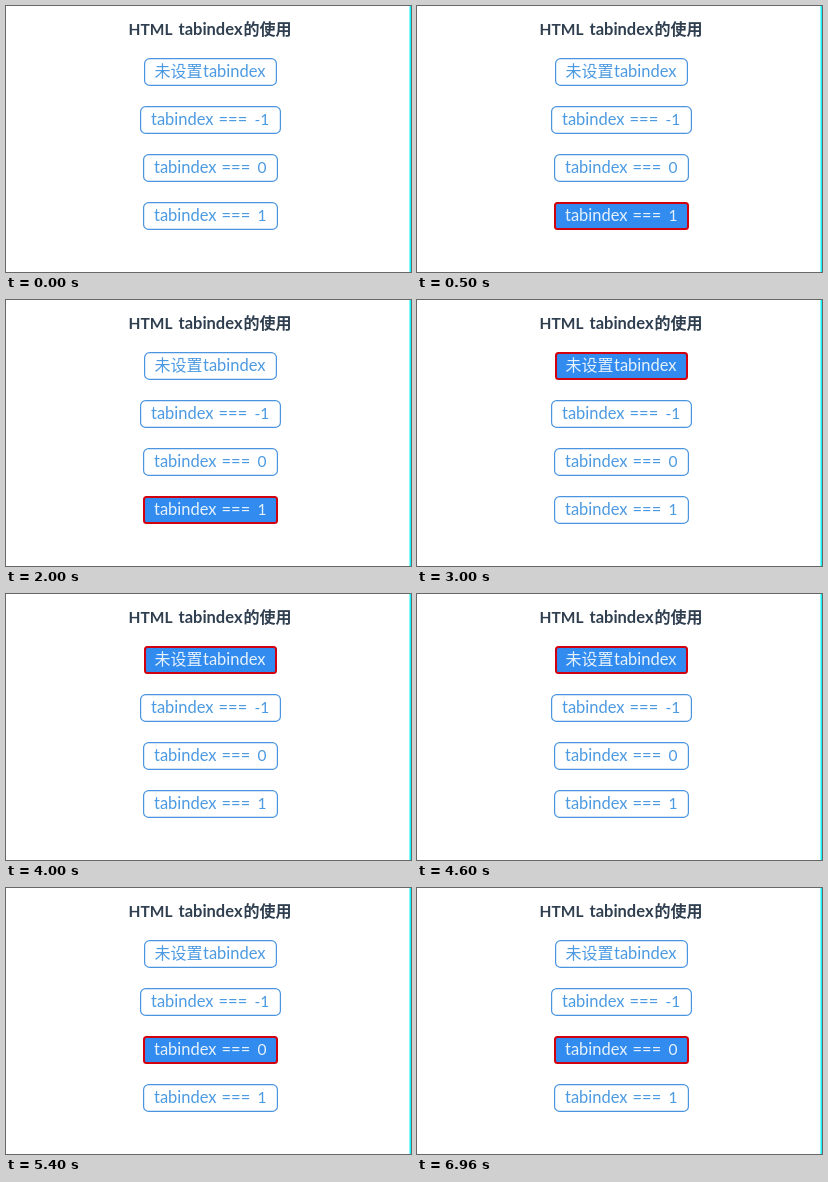
Write an HTML page with a canvas that moves like this. It is 405 px wide and 266 px high and loops after 8 s.

```html
<!DOCTYPE html>
<html lang="zh-CN">
<head>
<meta charset="utf-8">
<title>HTML tabindex的使用</title>
<style>
  html, body { margin: 0; width: 100%; height: 100%; overflow: hidden; background: #fff; }
  canvas { display: block; width: 405px; height: 266px; }
</style>
</head>
<body>
<canvas id="stage"></canvas>
<script>
const W = 405, H = 266, LOOP = 8000;
const INK = '#2f3f50', BORDER = '#4a94e0', LABEL = '#4c9ae2';
const FILL = '#328bee', FOCUS_BORDER = '#d2000f', FOCUS_LABEL = '#e6f2fd';
const LATIN = 'Lato, "Noto Sans CJK SC", "Noto Sans CJK", sans-serif';
const HAN = '"Noto Sans CJK SC", "Noto Sans CJK", sans-serif';

const canvas = document.getElementById('stage');
const ctx = canvas.getContext('2d');
const scale = window.devicePixelRatio || 1;
canvas.width = W * scale;
canvas.height = H * scale;

// Each word is [text, x, font]
const latin = (text, x, size = 16.5) => [text, x, `${size}px ${LATIN}`];
const han = (text, x) => [text, x, `16px ${HAN}`];
const row = (x, value, valueX) => [
  latin('tabindex', x), latin('===', x + 67.5), latin(value, valueX, 15.5)
];

const buttons = [
  { x: 138, y: 52, w: 133, words: [han('未设置', 148.5), latin('tabindex', 197)] },
  { x: 134, y: 100, w: 141, words: row(145, '-1', 248.5) },
  { x: 137, y: 148, w: 135, words: row(148, '0', 251.5) },
  { x: 137, y: 196, w: 135, words: row(148, '1', 251.5) }
];
const title = [
  ['HTML', 122.5, `bold 15.5px ${LATIN}`],
  ['tabindex', 172.5, `bold 16.5px ${LATIN}`],
  ['的使用', 237.5, `bold 16px ${HAN}`]
];

// Focus changes: [start time, button index]
const focusSteps = [[0, -1], [500, 3], [3000, 0], [5400, 2]];

function drawWords(words, y, color) {
  ctx.fillStyle = color;
  for (const [text, x, font] of words) {
    ctx.font = font;
    ctx.fillText(text, x, y);
  }
}

function drawButton({ x, y, w, words }, focused) {
  const inset = focused ? 1 : 0.6;
  ctx.beginPath();
  ctx.roundRect(x + inset, y + inset, w - 2 * inset, 28 - 2 * inset, focused ? 2.5 : 5);
  ctx.fillStyle = focused ? FILL : '#fff';
  ctx.fill();
  ctx.lineWidth = focused ? 2 : 1.2;
  ctx.strokeStyle = focused ? FOCUS_BORDER : BORDER;
  ctx.stroke();
  drawWords(words, y + 19, focused ? FOCUS_LABEL : LABEL);
}

function draw(now) {
  const time = now % LOOP;
  const focus = focusSteps.filter(([start]) => start <= time).pop()[1];
  ctx.setTransform(scale, 0, 0, scale, 0, 0);
  ctx.fillStyle = '#fff';
  ctx.fillRect(0, 0, W, H);
  ctx.fillStyle = '#0cf3fb';
  ctx.fillRect(403.5, 0, 1.5, H);
  drawWords(title, 29, INK);
  buttons.forEach((button, i) => drawButton(button, i === focus));
}

const origin = performance.now();
function tick() {
  draw(performance.now() - origin);
  requestAnimationFrame(tick);
}
tick();
</script>
</body>
</html>
```
